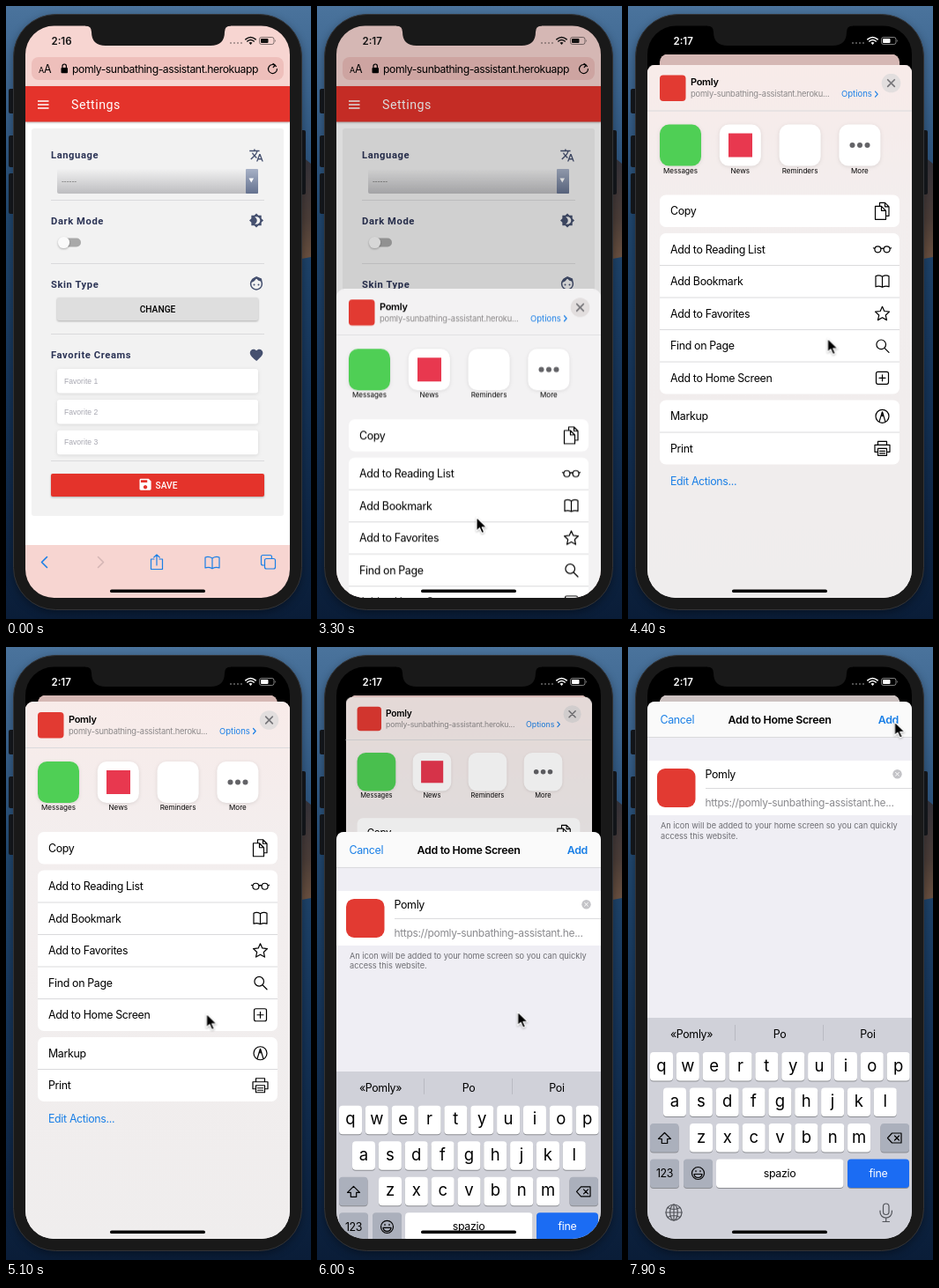
Recreate the animation shown at these times as an HTML page. Size 346 by 696 pixels, loop 8 s.

```html
<!DOCTYPE html>
<html lang="en">
<head>
<meta charset="utf-8">
<title>Add to Home Screen</title>
<style>
html, body { margin: 0; width: 100%; height: 100%; overflow: hidden; background: #17304f; }
svg { display: block; width: 100%; height: 100%; }
text { font: 12.4px Inter, sans-serif; letter-spacing: -.027em; white-space: pre; }
.mid { text-anchor: middle; }
.end { text-anchor: end; }
.semi { font-weight: 600; }
.blue { fill: #1a7fe6; }
.line { fill: none; stroke: currentColor; stroke-width: 1.2; stroke-linejoin: round; stroke-linecap: round; }
.rule { stroke: #dadadc; stroke-width: 1; }
.url { font-size: 12.2px; letter-spacing: -.035em; }
.label { font: 700 11.2px Roboto, sans-serif; letter-spacing: .6px; fill: #2b3355; }
.button { font: 500 10.2px Roboto, sans-serif; letter-spacing: 0; }
.hint { font: 8.6px "Liberation Sans", sans-serif; letter-spacing: 0; fill: #a6a6b0; }
.small { font-size: 8.1px; letter-spacing: 0; }
.raised { filter: drop-shadow(0 1px 1px rgba(0,0,0,.28)); }
.soft { filter: drop-shadow(0 1px 2px rgba(0,0,0,.1)); }
.body { filter: drop-shadow(0 3px 5px rgba(0,0,0,.35)); }
.key { fill: #fff; }
.key, .mod, .go { filter: drop-shadow(0 1px 0 #8b8d92); }
.mod { fill: #abb0bc; }
.go { fill: #1b6cf3; }
.letter { font-size: 18.5px; letter-spacing: 0; }

.anim { animation: 8s linear infinite; }
#page { animation-name: page; transform-origin: 172px 22px; }
#pageDim { animation-name: pageDim; }
#share { animation-name: share; transform-origin: 172px 62px; }
#tint { animation-name: tint; }
#shareDim { animation-name: shareDim; }
#add { animation-name: add; }
#keys { animation-name: keys; }
#status { animation-name: status; }
#before { animation-name: before; }
#after { animation-name: after; }
#caret { animation-name: caret; }
#pointer { animation-name: pointer; }

@keyframes page {
  0%, 46% { transform: none; }
  54%, 100% { transform: translateY(32.5px) scale(.907); }
}
@keyframes pageDim {
  0%, 34% { opacity: 0; }
  40%, 100% { opacity: .14; }
}
@keyframes share {
  0%, 34% { transform: translateY(625px); animation-timing-function: cubic-bezier(.3,.4,.2,1); }
  41%, 46% { transform: translateY(259.3px); animation-timing-function: cubic-bezier(.4,.1,.7,.9); }
  52.5% { transform: translateY(57px); animation-timing-function: cubic-bezier(.2,.6,.5,1); }
  55% { transform: translateY(4.6px); animation-timing-function: ease-out; }
  57.5%, 72.08% { transform: none; animation-timing-function: cubic-bezier(.4,.35,.2,1); }
  79%, 100% { transform: translateY(-7px) scale(.907); }
}
@keyframes tint {
  0%, 46% { opacity: 0; }
  54%, 100% { opacity: 1; }
}
@keyframes shareDim {
  0%, 72.08% { opacity: 0; }
  79%, 100% { opacity: .18; }
}
@keyframes add {
  0%, 72.08% { transform: translateY(610px); animation-timing-function: cubic-bezier(.4,.35,.2,1); }
  79%, 100% { transform: none; }
}
@keyframes keys {
  0%, 72.08% { transform: translateY(251px); animation-timing-function: cubic-bezier(.4,.35,.2,1); }
  79%, 100% { transform: none; }
}
@keyframes status {
  0%, 48% { color: #111; }
  53%, 100% { color: #fff; }
}
@keyframes before {
  0%, 23.74% { opacity: 1; }
  23.75%, 100% { opacity: 0; }
}
@keyframes after {
  0%, 23.74% { opacity: 0; }
  23.75%, 100% { opacity: 1; }
}
@keyframes caret {
  0% { opacity: 0; animation-timing-function: step-end; }
  78.75% { opacity: 1; animation-timing-function: step-end; }
  85.4% { opacity: 0; animation-timing-function: step-end; }
  92% { opacity: 1; animation-timing-function: step-end; }
  98.6%, 100% { opacity: 0; }
}
@keyframes pointer {
  0%, 12.5% { transform: translate(356px, 520px); animation-timing-function: ease-in-out; }
  24.5%, 34.5% { transform: translate(167px, 627px); animation-timing-function: ease-in-out; }
  40%, 46% { transform: translate(181px, 580.5px); animation-timing-function: cubic-bezier(.4,.1,.7,.9); }
  52.5%, 56% { transform: translate(226.5px, 377.5px); animation-timing-function: ease-in-out; }
  64%, 74% { transform: translate(227.5px, 416.5px); animation-timing-function: ease-in-out; }
  83%, 86% { transform: translate(234.5px, 324px); animation-timing-function: ease-in-out; }
  96%, 100% { transform: translate(302.5px, 85px); }
}
</style>
</head>
<body>
<svg viewBox="0 0 346 696">
  <defs>
    <linearGradient id="sea" x2="0" y2="1">
      <stop offset="0" stop-color="#4a739c"/><stop offset=".14" stop-color="#3b638d"/>
      <stop offset=".35" stop-color="#20466d"/><stop offset=".65" stop-color="#143256"/>
      <stop offset="1" stop-color="#0a1d38"/>
    </linearGradient>
    <linearGradient id="rock" x2="0" y2="1">
      <stop offset="0" stop-color="#33323a"/><stop offset=".6" stop-color="#4b3d38"/><stop offset="1" stop-color="#6a5140"/>
    </linearGradient>
    <linearGradient id="field" x2="0" y2="1">
      <stop offset="0" stop-color="#f1f1f1"/><stop offset="1" stop-color="#bdbdc0"/>
    </linearGradient>
    <linearGradient id="arrow" x2="0" y2="1">
      <stop offset="0" stop-color="#a7b1c6"/><stop offset="1" stop-color="#65728f"/>
    </linearGradient>
    <linearGradient id="warm" x2="0" y2="1">
      <stop offset="0" stop-color="#f8ebe9"/><stop offset=".25" stop-color="#f3eeee"/><stop offset="1" stop-color="#efeded"/>
    </linearGradient>
    <clipPath id="screen"><rect x="22" y="22.500" width="300" height="649.500" rx="32.500"/></clipPath>
  </defs>

  <rect width="346" height="696" fill="url(#sea)"/>
  <path d="M330 174l6-3 10 8v106l-16 3z" fill="url(#rock)"/>
  <g fill="#15181d">
    <rect x="3" y="94" width="8" height="28" rx="2"/>
    <rect x="3" y="147" width="8" height="36" rx="2"/>
    <rect x="3" y="190" width="8" height="46" rx="2"/>
    <rect x="332" y="141" width="8" height="73" rx="2"/>
  </g>
  <rect x="8.500" y="9.500" width="327" height="676" rx="48" fill="#191919" stroke="#333437" class="body"/>

  <g clip-path="url(#screen)">
    <rect x="22" y="22" width="300" height="650"/>

    <g id="page" class="anim">
      <rect x="22" y="22" width="300" height="650" rx="10" fill="#f7d5d1"/>
      <rect x="29" y="58" width="286" height="26" rx="8" fill="#eebfbb"/>
      <text x="37" y="75.500" style="font-size:9px">A</text><text x="43" y="75.500">A</text>
      <rect x="62.500" y="70" width="7.500" height="6.300" rx="1"/>
      <path d="M64 70v-1.800a2.200 2.200 0 0 1 4.400 0V70" class="line"/>
      <text x="75" y="75.600" class="url">pomly-sunbathing-assistant.herokuapp</text>
      <path d="M306.500 68.500a5 5 0 1 0 1 3M303 65.500l2.500 1.800-2.300 2.200" class="line"/>
      <rect x="22" y="131" width="300" height="481" fill="#fff"/>
      <rect x="22" y="91" width="300" height="40.500" fill="#e4332b" class="raised"/>
      <path d="M36 108h12.500M36 112h12.500M36 116h12.500" stroke="#fff" stroke-width="1.500"/>
      <text x="74" y="117" fill="#fff" style="font:14.2px Roboto,sans-serif;letter-spacing:.5px">Settings</text>
      <rect x="29" y="139" width="286" height="440" rx="3" fill="#f2f2f2"/>
      <g id="settings"></g>
      <g fill="#45506f">
        <path transform="translate(275.500 161) scale(.71)" d="M12.870 15.070l-2.540-2.510.03-.03c1.740-1.940 2.980-4.170 3.710-6.530H17V4h-7V2H8v2H1v1.990h11.170C11.500 7.920 10.440 9.750 9 11.350 8.070 10.320 7.300 9.190 6.690 8h-2c.73 1.630 1.730 3.170 2.980 4.560l-5.090 5.020L4 19l5-5 3.110 3.110.76-2.040zM18.500 10h-2L12 22h2l1.120-3h4.750L21 22h2l-4.500-12zm-2.620 7l1.620-4.330L19.120 17h-3.240z"/>
        <path transform="translate(275.500 235) scale(.71)" d="M20 8.690V4h-4.690L12 .69 8.690 4H4v4.690L.69 12 4 15.310V20h4.690L12 23.310 15.310 20H20v-4.690L23.310 12 20 8.690zM12 18c-.89 0-1.740-.2-2.500-.55C11.560 16.500 13 14.420 13 12s-1.440-4.500-3.500-5.450C10.260 6.200 11.110 6 12 6c3.310 0 6 2.690 6 6s-2.690 6-6 6z"/>
        <circle cx="284" cy="315.500" r="6.400" fill="none" stroke="#45506f" stroke-width="1.500"/>
        <path d="M278 314q4.500-1 6-5 2 4 6.500 3.500l-.5-3-6-2.500-5 3z"/>
        <circle cx="281.500" cy="316.500" r="1"/><circle cx="286.500" cy="316.500" r="1"/>
        <path transform="translate(275.300 387.500) scale(.73)" d="M12 21.350l-1.450-1.320C5.400 15.360 2 12.280 2 8.500 2 5.420 4.420 3 7.500 3c1.740 0 3.410.81 4.500 2.090C13.090 3.810 14.760 3 16.500 3 19.580 3 22 5.420 22 8.500c0 3.780-3.400 6.860-8.550 11.540L12 21.350z"/>
      </g>
      <rect x="58" y="185" width="228" height="28" rx="2" fill="url(#field)"/>
      <rect x="272" y="185" width="14" height="28" rx="1" fill="url(#arrow)"/>
      <path d="M275.500 195.500h5.500l-2.750 5z" fill="#fff"/>
      <text x="63" y="202" class="hint" style="fill:#777">------</text>
      <rect x="62" y="263.500" width="23" height="10" rx="5" fill="#a9a9a9"/>
      <circle cx="65.500" cy="268.500" r="6.600" fill="#fafafa" class="raised"/>
      <rect x="58" y="331" width="228" height="26" rx="2" fill="#dedede" class="raised"/>
      <text x="172" y="347.700" class="button mid">CHANGE</text>
      <rect x="51" y="531" width="242" height="26" rx="2" fill="#e4332b" class="raised"/>
      <path transform="translate(149.300 534.500) scale(.73)" fill="#fff" d="M17 3H5c-1.110 0-2 .9-2 2v14c0 1.100.89 2 2 2h14c1.100 0 2-.9 2-2V7l-4-4zm-5 16c-1.660 0-3-1.340-3-3s1.340-3 3-3 3 1.340 3 3-1.340 3-3 3zm3-10H5V5h10v4z"/>
      <text x="169.500" y="547.600" fill="#fff" class="button">SAVE</text>
      <g class="line" color="#1a7fe6">
        <path d="M46.500 625.500l-6 6 6 6" stroke-width="1.600"/>
        <path d="M104.500 625.500l6 6-6 6" stroke="#d5b6b5" stroke-width="1.600"/>
        <path d="M168 628h-3.500v11.500h13V628H174M171 635v-12M167.800 626l3.200-3.200 3.200 3.200"/>
        <path d="M234 627q-4-2.500-8-1v12q4-1.500 8 .8 4-2.300 8-.8v-12q-4-1.500-8 1v11.800"/>
        <rect x="289.500" y="623.500" width="12" height="11.500" rx="2"/>
        <rect x="293.500" y="627.500" width="12" height="11.500" rx="2" fill="#f7d5d1"/>
      </g>
      <rect id="pageDim" class="anim" x="22" y="22" width="300" height="650" rx="10" opacity="0"/>
    </g>

    <g id="share" class="anim">
      <rect x="22" y="62" width="300" height="640" rx="9" fill="#f3f2f3"/>
      <rect id="tint" class="anim" x="22" y="62" width="300" height="640" rx="9" fill="url(#warm)"/>
      <rect x="36" y="74" width="29.500" height="29.500" rx="4" fill="#e23a32"/>
      <text x="71" y="85.500" class="semi" style="font-size:11px">Pomly</text>
      <text x="71" y="98.700" fill="#8b8889" style="font-size:9.300px;letter-spacing:-.02em">pomly-sunbathing-assistant.heroku...</text>
      <text x="242" y="98.700" class="blue" style="font-size:9.500px;letter-spacing:0">Options</text>
      <path d="M280.500 92.500l2.700 3-2.700 3" class="line" color="#1a7fe6"/>
      <circle cx="298.500" cy="83" r="10.800" fill="#e2dede"/>
      <path d="M294.700 79.200l7.600 7.600m0-7.600l-7.600 7.600" class="line" color="#77767a" style="stroke-width:1.700"/>
      <path d="M22 114.500h300" class="rule"/>
      <g id="apps"></g>
      <g id="rows"></g>
      <text x="48" y="539.500" class="blue">Edit Actions...</text>
      <rect id="shareDim" class="anim" x="22" y="62" width="300" height="640" rx="9" opacity="0"/>
    </g>

    <g id="add" class="anim">
      <rect x="22" y="62" width="300" height="640" rx="9" fill="#efeef4"/>
      <path d="M22 102V71q0-9 9-9h282q9 0 9 9v31z" fill="#fafafa"/>
      <path d="M22 102.500h300" class="rule"/>
      <text x="36.500" y="87" class="blue">Cancel</text>
      <text x="172" y="87" class="semi mid">Add to Home Screen</text>
      <text x="307" y="87" class="blue semi end">Add</text>
      <rect x="22" y="129" width="300" height="62" fill="#fff"/>
      <path d="M88 160.500h234" class="rule"/>
      <rect x="33" y="138" width="43.500" height="44" rx="9" fill="#e23a32"/>
      <text x="87.500" y="148.700">Pomly</text>
      <rect id="caret" class="anim" x="124" y="137" width="1" height="15" fill="#4a6fe0" opacity="0"/>
      <circle cx="305.500" cy="144.300" r="5.200" fill="#c3c3c7"/>
      <path d="M303.600 142.400l3.800 3.800m0-3.800l-3.800 3.800" class="line" color="#fff" style="stroke-width:1"/>
      <text x="87.500" y="180.800" fill="#8a8a8e" style="font-size:12px;letter-spacing:-.028em">https://pomly-sunbathing-assistant.he...</text>
      <g fill="#6d6d72">
        <text x="37" y="206" style="font-size:9.200px;letter-spacing:0">An icon will be added to your home screen so you can quickly</text>
        <text x="37" y="217.500" style="font-size:9.200px;letter-spacing:0">access this website.</text>
      </g>
    </g>

    <g id="keys" class="anim">
      <rect x="22" y="421" width="300" height="260" fill="#d0d1d9"/>
      <path d="M121.500 429v18M221.500 429v18" stroke="#b9bac2"/>
      <text x="72" y="444" class="mid">«Pomly»</text>
      <text x="172" y="444" class="mid">Po</text>
      <text x="272" y="444" class="mid">Poi</text>
      <g id="board"></g>
      <g class="line">
        <path d="M41.500 551.500l7 7h-3.800v5h-6.400v-5h-3.800z"/>
        <path d="M294.500 557.500l5-5.500h10.500v11h-10.500zM302.500 555l5 5m0-5l-5 5"/>
        <circle cx="79.500" cy="597.500" r="7"/>
        <path d="M75 598.500h9q-.5 4-4.500 4t-4.500-4zM77 594.500v1.200M82 594.500v1.200"/>
      </g>
      <g class="line" color="#515359">
        <circle cx="52" cy="642" r="9"/>
        <ellipse cx="52" cy="642" rx="4.300" ry="9"/>
        <path d="M43 642h18M52 633v18M45 636.500q7 4 14 0M45 647.500q7-4 14 0"/>
        <rect x="289.500" y="632" width="6.500" height="12.500" rx="3.250"/>
        <path d="M286 640v1.500a6.700 6.700 0 0 0 13.400 0V640M292.700 648.500v4M289 652.500h7.500"/>
      </g>
    </g>

    <g id="status" class="anim" color="#111">
      <g fill="currentColor">
        <text id="before" class="anim semi" x="51.500" y="43.500" style="font-size:11.500px;letter-spacing:0">2:16</text>
        <text id="after" class="anim semi" x="51.500" y="43.500" opacity="0" style="font-size:11.500px;letter-spacing:0">2:17</text>
        <path d="M254 42h2m2 0h2m2 0h2m2 0h2" stroke="currentColor" stroke-width="2" opacity=".3"/>
        <path d="M277.500 44l-2-2.300q2-1.500 4 0z"/>
        <path d="M273.800 40q3.700-3 7.400 0M271.800 37.800q5.700-4.600 11.400 0" class="line" style="stroke-width:1.600"/>
        <rect x="287.500" y="35.500" width="16.500" height="8" rx="2.300" fill="none" stroke="currentColor" stroke-opacity=".5"/>
        <rect x="289" y="37" width="8.500" height="5" rx="1"/>
        <path d="M305.300 38v3q1.500-1.500 0-3z" opacity=".6"/>
      </g>
    </g>
    <rect x="118" y="662.400" width="108" height="3.700" rx="1.850"/>
  </g>
  <path d="M90 20v2.500q7 0 7 7 0 15.500 16 15.500h119q16 0 16-15.500 0-7 7-7v-2.500z" fill="#191919"/>

  <g id="pointer" class="anim">
    <path d="M0 0v15.500l3.500-3.300 2.500 5.800 2.700-1.200-2.500-5.600h5z" fill="#000" stroke="#fff" stroke-width="1.100" stroke-linejoin="round" class="raised"/>
  </g>
</svg>
<script>
const fill = (id, parts) => document.getElementById(id).innerHTML = parts.join('');
const box = (x, y, w, h, r, attrs) =>
  `<rect x="${x}" y="${y}" width="${w}" height="${h}" rx="${r}" ${attrs}/>`;
const text = (x, y, s, cls, attrs = '') => `<text x="${x}" y="${y}" class="${cls}" ${attrs}>${s}</text>`;
const rule = (x1, x2, y) => `<path class="rule" d="M${x1} ${y}H${x2}"/>`;

fill('settings', [
  ...[['Language', 173], ['Dark Mode', 247.5], ['Skin Type', 319.5], ['Favorite Creams', 400]]
    .map(([s, y]) => text(51, y, s, 'label')),
  ...[220.5, 292.5, 372.5, 516.5].map(y => rule(51, 293, y)),
  ...[1, 2, 3].map(n => {
    const y = 377.3 + 34.8 * n;
    return box(58, y, 228, 27.5, 3, 'fill="#fff" class="soft"') + text(66, y + 16.7, 'Favorite ' + n, 'hint');
  })
]);

const tile = (i, color) => box(36 + 67.8 * i, 130, 47, 47, 10.5, `fill="${color}" class="soft"`);
fill('apps', [
  tile(0, '#4fcf55'), tile(1, '#fff'), tile(2, '#fff'), tile(3, '#fff'),
  box(114, 140, 27, 27, 0, 'fill="#e8384f"'),
  ...[-8.5, 0, 8.5].map(d => `<circle cx="${263 + d}" cy="153.5" r="3" fill="#636367"/>`),
  ...['Messages', 'News', 'Reminders', 'More'].map((s, i) => text(59.5 + 67.8 * i, 185, s, 'small mid'))
]);

const groups = [
  [210, [['Copy', 'M-3-5.500V-9.500H3l4.500 4.500V5.500H4M3-9.500V-5H7.500M-8-5.500H-1L4-.5V9.500H-8zM-1-5.500V-.5H4']]],
  [253.5, [
    ['Add to Reading List', 'M-8.600 0a3.500 3.500 0 1 0 7 0a3.500 3.500 0 1 0-7 0M1.600 0a3.500 3.500 0 1 0 7 0a3.500 3.500 0 1 0-7 0M-1.600-.5q1.600-1.500 3.200 0M-8.600-.8l-1.500-.7M8.600-.8l1.500-.7'],
    ['Add Bookmark', 'M0-5.500Q-4-8-7.500-6V6Q-4 4.500 0 6.500 4 4.500 7.500 6V-6Q4-8 0-5.500V6.500'],
    ['Add to Favorites', 'M0-8l2.300 5.200 5.700.6-4.200 3.900L5 7.300 0 4.400l-5 2.900 1.200-5.600L-8-2.200l5.700-.6z'],
    ['Find on Page', 'M4-1.500a5.300 5.300 0 1 1-10.600 0a5.300 5.300 0 1 1 10.600 0M2.500 2.500L7.500 7.500'],
    ['Add to Home Screen', 'M-5-7H5q2 0 2 2V5q0 2-2 2H-5q-2 0-2-2V-5q0-2 2-2zM0-3.500v7M-3.500 0h7']
  ]],
  [443, [
    ['Markup', 'M-7.500 0a7.500 7.500 0 1 0 15 0a7.500 7.500 0 1 0-15 0M-3.500 6.300L-1-2 0-5 1-2 3.500 6.300M-1-2h2v1.500h-2z'],
    ['Print', 'M-5-4v-4H5v4M-5 4h-3.500v-8h17v8H5M-5 0H5v8H-5zM-3 3h6M-3 5.500h6']
  ]]
];
const rowH = 36.5;
fill('rows', groups.map(([top, items]) =>
  box(36, top, 272, rowH * items.length, 7, 'fill="#fff"') +
  items.map(([name, d], i) => {
    const y = top + rowH * (i + .5);
    return (i ? rule(36, 308, top + rowH * i) : '') + text(48, y + 4.4, name, '') +
      `<path class="line" transform="translate(288.500 ${y})" d="${d}"/>`;
  }).join('')
));

const keyRow = (letters, x0, y) => [...letters].map((c, i) => {
  const x = x0 + 29.85 * i;
  return box(x, y, 26, 32.5, 4, 'class="key"') + text(x + 13, y + 21.5, c, 'letter mid');
}).join('');
fill('board', [
  keyRow('qwertyuiop', 25, 460), keyRow('asdfghjkl', 40, 500.5), keyRow('zxcvbnm', 70, 541),
  box(25, 541, 32.5, 32.5, 4, 'class="mod"'), box(286.5, 541, 32.5, 32.5, 4, 'class="mod"'),
  box(25, 581.5, 33, 32.5, 4, 'class="mod"'), box(63, 581.5, 33, 32.5, 4, 'class="mod"'),
  box(100, 581.5, 144.5, 32.5, 4, 'class="key"'), box(249, 581.5, 70, 32.5, 4, 'class="go"'),
  text(41.5, 602, '123', 'mid'), text(172, 601.5, 'spazio', 'mid'),
  text(284, 601.5, 'fine', 'mid', 'fill="#fff"')
]);

// Keep the caret right after the typed name.
const caret = document.getElementById('caret');
const typed = caret.previousElementSibling;
caret.setAttribute('x', 88 + typed.getComputedTextLength());
</script>
</body>
</html>
```
